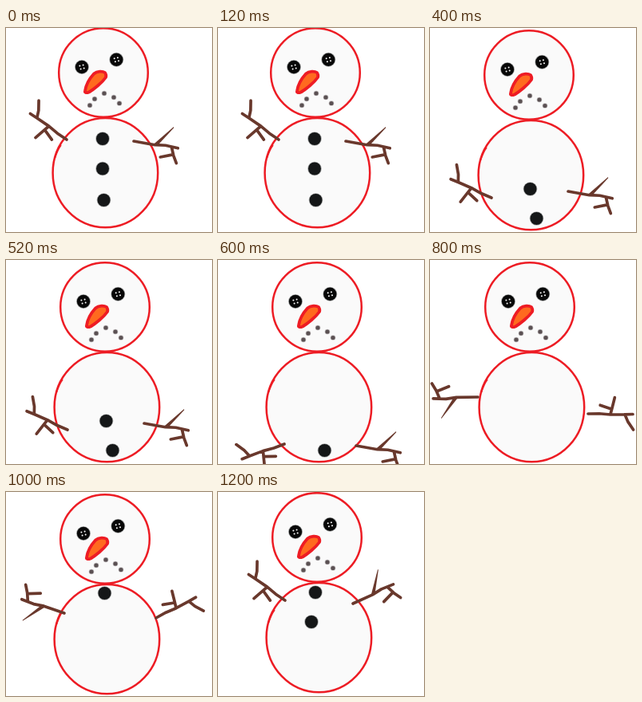
Animation of 258 by 256 pixels, one loop 1.4 s. Source, as an HTML page:

```html
<!DOCTYPE html>
<html lang="en">
<head>
<meta charset="utf-8">
<title>Snowman</title>
<style>
  html, body { margin: 0; height: 100%; overflow: hidden; background: #fff; }
  svg { display: block; width: 100vw; height: 100vh; }
  .snow { fill: #fafafa; stroke: #ed1c24; stroke-width: 2.5; }
  .arm { fill: none; stroke: #69382c; stroke-width: 3.7; stroke-linecap: round; stroke-linejoin: round; }
  .twig { fill: #69382c; stroke: none; }
  .button { fill: #151718; stroke: #151718; stroke-opacity: .35; stroke-width: 1.6; }
  .mouth { fill: #5b5153; stroke: #5b5153; stroke-opacity: .35; stroke-width: 1.4; }
</style>
</head>
<body>
<svg viewBox="0 0 258 256">
  <defs>
    <g id="eye">
      <circle class="button" r="8.2" style="fill:#080808"/>
      <g fill="#fff">
        <circle cx="-2.6" cy="-1.4" r="1"/><circle cx="1.6" cy="-2.4" r="1"/>
        <circle cx="-1.4" cy="2.6" r="1"/><circle cx="2.7" cy="1.6" r="1"/>
      </g>
    </g>
  </defs>
  <g id="snowman">
    <circle class="snow" cx="122" cy="56" r="55.8"/>
    <ellipse class="snow" cx="124.400" cy="181.700" rx="65.800" ry="68.600"/>
    <path d="M61.500 163Q64.500 153 69 147" fill="none" stroke="#ed1c24" stroke-width="1.6"/>
    <use href="#eye" x="95" y="49"/>
    <use href="#eye" x="138.3" y="39.7"/>
    <path d="M99 79C100 72 105 63 110 57.500C114 54 121 54 124 56Q126 59 125 62C120 69 110 77 104 80.500C100 82 98.500 81 99 79Z"
      fill="#ff6a1f" stroke="#ee1c24" stroke-width="3.8" stroke-linejoin="round"/>
    <g class="mouth">
      <circle cx="105" cy="97" r="2.6"/><circle cx="111" cy="89" r="2.6"/>
      <circle cx="123" cy="82" r="2.6"/><circle cx="135" cy="87" r="2.6"/>
      <circle cx="142" cy="94.500" r="2.6"/>
    </g>
  </g>
  <g id="buttons">
    <circle class="button" r="8"/><circle class="button" r="8"/><circle class="button" r="8"/>
  </g>
  <!-- Both arms point right from the shoulder at the origin -->
  <g id="hookArm" class="arm">
    <path d="M0 0L14 -.5L28 .5L46 0L56 -.5M46 0L50 9L57 19M28 0L30 -8L33 -21M29 -6.500L15 -11"/>
  </g>
  <g id="forkArm" class="arm">
    <path d="M0 0L27 .5L40 -1L56 0M48 0L52 10L57 19M36 14.500L51 9"/>
    <path class="twig" d="M26 -1L46.600 -25.500L47 -24.500L30 1Z"/>
  </g>
</svg>
<script>
  const STEP = 200;
  // body: offset; hook, fork: shoulder x, y and angle; dots: button centres
  const poses = [
    { body: [0, 0], hook: [76, 140, 216], fork: [160, 142, 9], dots: [[121, 139], [121, 176.5], [122.5, 216]] },
    { body: [2, 1], hook: [70, 158, 216], fork: [169, 170, 8], dots: [[119.5, 159], [124, 196.5], [130, 236]] },
    { body: [2, 3], hook: [77, 213, 205], fork: [173, 205, 9], dots: [[125.5, 202], [133.5, 239]] },
    { body: [2, 3], hook: [83, 231, 161], fork: [173, 233, 9], dots: [[133.5, 239]] },
    { body: [3, 3], hook: [198, 193, 1], fork: [60, 172, 178], dots: [] },
    { body: [2, 3], hook: [188, 158, -27], fork: [73, 152, 198], dots: [[123.5, 127]] },
    { body: [2, 1], hook: [84, 136, 216], fork: [169, 140, -25.5], dots: [[122, 126], [117, 163]] }
  ];
  const byId = id => document.getElementById(id);
  const place = (el, [x, y, turn = 0]) =>
    el.setAttribute('transform', `translate(${x} ${y}) rotate(${turn})`);
  const buttons = [...byId('buttons').children];

  function draw() {
    const pose = poses[Math.floor(performance.now() / STEP) % poses.length];
    place(byId('snowman'), pose.body);
    place(byId('hookArm'), pose.hook);
    place(byId('forkArm'), pose.fork);
    buttons.forEach((button, i) => {
      const dot = pose.dots[i];
      button.style.display = dot ? '' : 'none';
      if (dot) place(button, dot);
    });
    requestAnimationFrame(draw);
  }
  draw();
</script>
</body>
</html>
```
